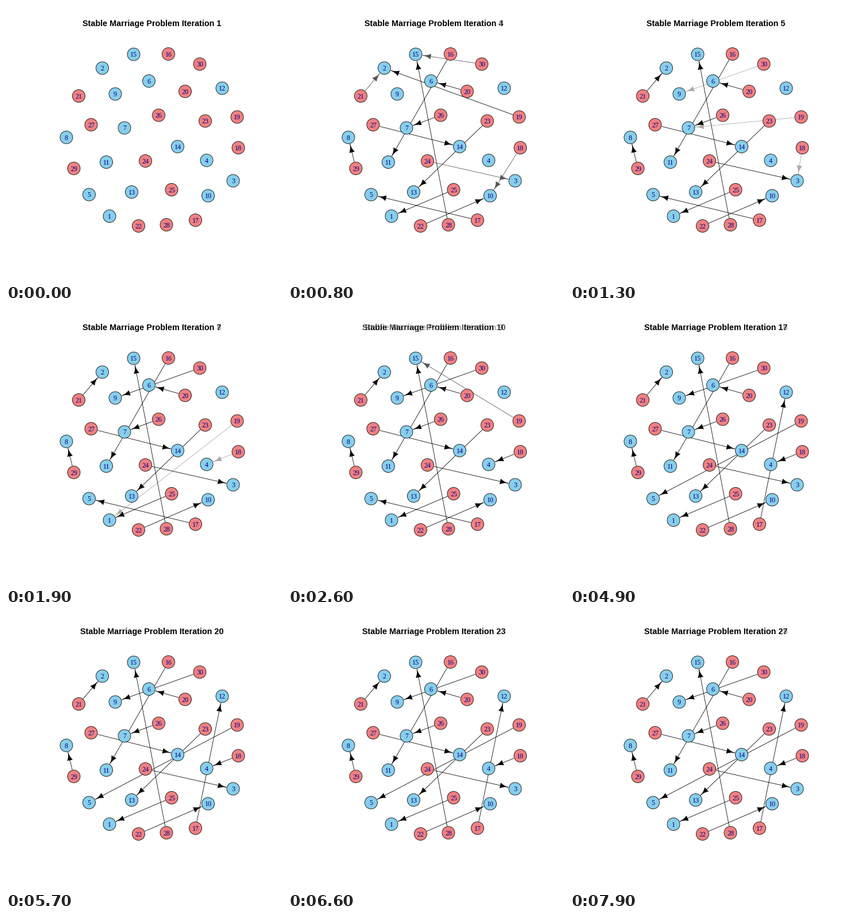
Recreate the animation shown at these times as a matplotlib script. Size 480 by 480 pixels, loop 8 s.

```python
import numpy as np
import matplotlib.pyplot as plt
from matplotlib.animation import FuncAnimation
from matplotlib.patches import Circle, Polygon

SIZE, DPI = 480, 80
PX = 72 / DPI               # points per pixel
STEPS = 3                   # frames from one iteration to the next
FRAMES = 80
RADIUS, GAP = 11, 12        # node radius, distance of edge ends from centres
HEAD, HALF = 14.4, 4.4      # arrowhead length and half width

NODES = [
    (180, 365.5), (167.5, 108), (395, 304), (349, 268.5), (144.5, 328),
    (248.5, 130.5), (206, 212), (105, 228.5), (190, 153), (351.5, 330),
    (174.5, 271.5), (376, 143), (218.5, 323.5), (298.5, 244.5), (222, 84),
    (282.5, 83.5), (329.5, 372.5), (404, 246.5), (402, 193), (311.5, 148.5),
    (126.5, 156.5), (230.5, 382.5), (346.5, 200), (242.5, 269.5),
    (288, 319.5), (265.5, 190), (148, 206.5), (279, 380.5), (118, 282.5),
    (337, 101),
]

# Iteration -> suitors whose proposal changes (None: rejected).
CHANGES = {
    2: {16: 11, 17: 5, 18: 14, 19: 2, 20: 6, 21: 7, 22: 10, 23: 13,
        24: 13, 25: 1, 26: 7, 27: 14, 28: 15, 29: 8, 30: 6},
    3: {18: None, 21: None, 24: None, 30: None},
    4: {18: 10, 21: 2, 24: 3, 30: 15},
    5: {18: None, 19: None, 30: None},
    6: {18: 3, 19: 7, 30: 9},
    7: {18: None, 19: None},
    8: {18: 4, 19: 1},
    9: {19: None},
    10: {19: 15},
    11: {19: None},
    12: {19: 5},
    13: {17: None},
    14: {17: 12},
}


def draw_arrow(ax, a, b):
    a, b = np.array(a), np.array(b)
    u = (b - a) / np.hypot(*(b - a))
    n = np.array([-u[1], u[0]])
    start, tip = a + GAP * u, b - GAP * u
    end = tip - 0.7 * HEAD * u
    ax.plot([start[0], end[0]], [start[1], end[1]], color="black",
            lw=0.8 * PX, zorder=1)
    # The sides of the head curve inwards.
    t = np.sqrt(np.linspace(0, 1, 9))[:, None]
    back, side = tip - HEAD * t * u, (HALF * t**2 + 0.07) * n
    ax.add_patch(Polygon(np.vstack([(back - side)[::-1], back + side]),
                         fc="black", ec="black", lw=0.5 * PX, zorder=1))


def draw_scene(fig, iteration, pairs):
    fig.clear()
    ax = fig.add_axes([0, 0, 1, 1])
    ax.set(xlim=(0, SIZE), ylim=(SIZE, 0))
    ax.axis("off")
    for suitor, choice in pairs.items():
        if choice:
            draw_arrow(ax, NODES[suitor - 1], NODES[choice - 1])
    for i, (x, y) in enumerate(NODES, 1):
        ax.add_patch(Circle((x, y), RADIUS, ec="black", lw=0.8 * PX, zorder=2,
                            fc="skyblue" if i <= 15 else "lightcoral"))
        ax.text(x, y + 4.3, str(i), ha="center", va="baseline", zorder=3,
                color="#00008b", family="Liberation Serif", size=12 * PX)
    ax.text(254, 35, f"Stable Marriage Problem Iteration {iteration}",
            ha="center", va="baseline", family="Liberation Sans",
            weight="bold", size=14.4 * PX)


def render_all(fig):
    shots, pairs = [], {}
    for k in range(1, (FRAMES - 1) // STEPS + 3):
        pairs.update(CHANGES.get(k, {}))
        draw_scene(fig, k, pairs)
        fig.canvas.draw()
        shots.append(np.asarray(fig.canvas.buffer_rgba())[..., :3] / 255)
    return shots


fig = plt.figure(figsize=(SIZE / DPI, SIZE / DPI), dpi=DPI, facecolor="white")
shots = render_all(fig)
fig.clear()
image = fig.figimage(shots[0], origin="upper")


def update(frame):
    k, step = divmod(frame, STEPS)
    t = step / STEPS
    image.set_data((1 - t) * shots[k] + t * shots[k + 1])
    return [image]


anim = FuncAnimation(fig, update, frames=FRAMES, interval=100,
                     repeat=True, repeat_delay=0)
plt.show()
```
